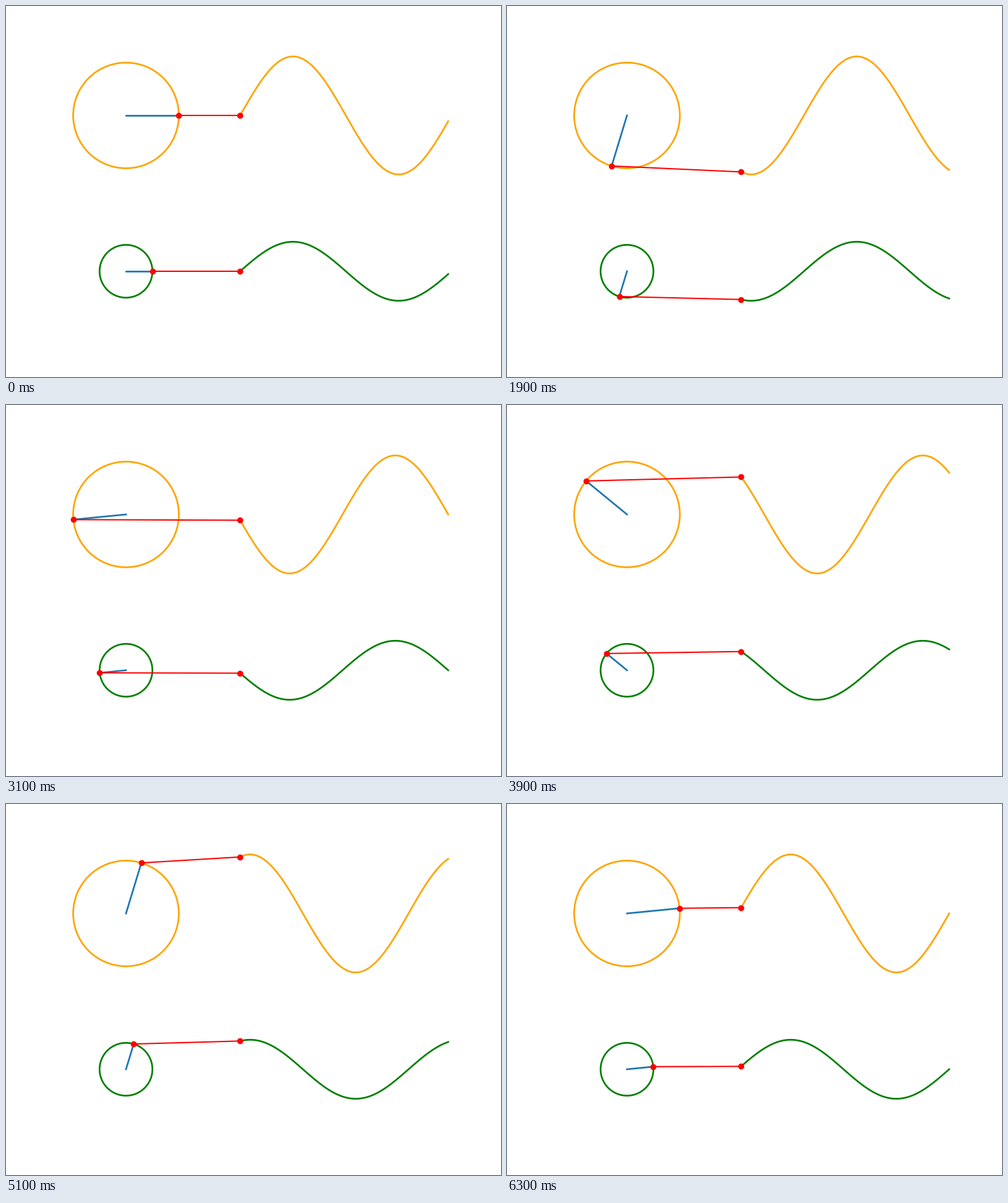
A matplotlib script for the animation above (6400 ms loop, 800x600 px).

```python
import matplotlib.pyplot as plt
import numpy as np
from matplotlib.animation import FuncAnimation
from matplotlib.patches import ConnectionPatch

STEPS = 64
phases = np.linspace(0, 2 * np.pi, STEPS, endpoint=False)


class Rotor:
    """A turning radius linked to the sine wave it traces."""

    def __init__(self, fig, circle_ax, wave_ax, radius, color):
        self.radius = radius
        circle_ax.set(xlim=(-1.1, 1.1), ylim=(-1.1, 1.1), aspect="equal")
        wave_ax.set(xlim=(-0.2 * np.pi, 2 * np.pi), ylim=(-1.1, 1.1))
        for ax in (circle_ax, wave_ax):
            ax.axis("off")

        circle_ax.add_patch(
            plt.Circle((0, 0), radius, fill=False, ec=color, lw=2))
        self.arm, = circle_ax.plot([], [], color="C0", lw=2)
        self.rim_dot, = circle_ax.plot([], [], "ro")
        self.wave, = wave_ax.plot([], [], color=color, lw=2)
        self.wave_dot, = wave_ax.plot([], [], "ro")
        self.link = ConnectionPatch(
            (0, 0), (0, 0), "data", "data", axesA=circle_ax, axesB=wave_ax,
            color="red", lw=1.5)
        fig.add_artist(self.link)

    def turn(self, angle):
        x, y = self.radius * np.cos(angle), self.radius * np.sin(angle)
        self.arm.set_data([0, x], [0, y])
        self.rim_dot.set_data([x], [y])
        self.wave.set_data(phases, self.radius * np.sin(phases + angle))
        self.wave_dot.set_data([0], [y])
        self.link.xy1 = (x, y)
        self.link.xy2 = (0, y)


fig, axes = plt.subplots(2, 2, figsize=(8, 6), dpi=100,
                         gridspec_kw={"width_ratios": [1, 2]})
rotors = [Rotor(fig, *axes[0], 1.0, "orange"),
          Rotor(fig, *axes[1], 0.5, "green")]


def update(i):
    for rotor in rotors:
        rotor.turn(-phases[i])


anim = FuncAnimation(fig, update, frames=STEPS, interval=100,
                     init_func=lambda: update(0), repeat=True)
plt.show()
```
